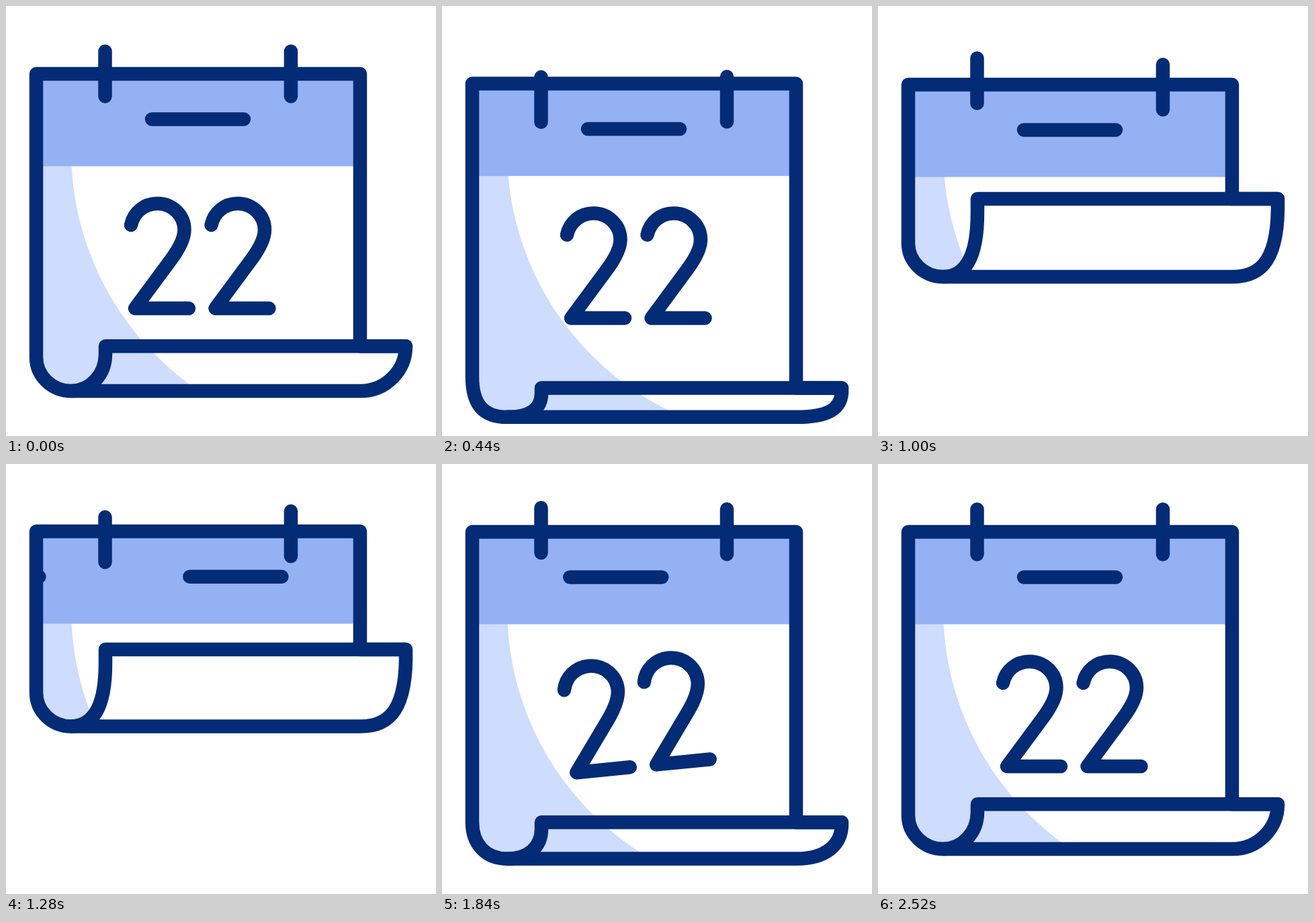
An HTML page with a canvas for the animation above (2.88 s loop, 640x640 px).

```html
<!DOCTYPE html>
<html lang="en">
<head>
<meta charset="utf-8">
<title>Calendar</title>
<style>
  html, body { margin: 0; width: 100%; height: 100%; overflow: hidden; background: #fff; }
  canvas { display: block; width: 100vmin; height: 100vmin; }
</style>
</head>
<body>
<canvas id="stage" width="640" height="640"></canvas>
<script>
const ctx = document.getElementById('stage').getContext('2d');
const NAVY = '#042b76', HEADER = '#94b1f3', SHADE = '#cedcfd';
const LOOP = 2880, STEP = 40, SETTLED = 2520;
const LEFT = 45, RIGHT = 527, CURL = 148, EDGE = 595;
const LONGEST_ROLL = 116, SHORTEST_PAGE = 286;

// Eased progress from time a to time b.
function ease(t, a, b) {
  const u = Math.min(1, Math.max(0, (t - a) / (b - a)));
  return u * u * (3 - 2 * u);
}

// Adds eased moves, each [from, to, distance], to a resting value.
const moves = (rest, ...list) => t =>
  list.reduce((value, [a, b, by]) => value + by * ease(t, a, b), rest);

const bodyTop = moves(101, [0, 425, 15], [425, 680, -46], [680, 1000, 47], [1000, 1480, -27], [1480, 1840, 11]);
const ringY = moves(101, [0, 150, -8], [150, 420, 47], [420, 700, -85], [700, 1090, 76], [1090, 1500, -61], [1500, 1860, 31]);
const pageLength = moves(472, [0, 355, 39], [355, 900, -225], [1240, 1715, 216], [1715, 1960, -30]);
const calm = moves(1, [0, 400, -1], [1640, 2040, 1]);
const dashShift = moves(0, [1040, 2000, 361]);
const tilt = moves(0, [1440, 1600, 4], [1600, 1840, -9.7], [1840, 2100, 7.7], [2100, 2400, -2]);

const digit = new Path2D('M186 326C190 307 206 294 225.5 294C248 294 265.5 312 265.5 333' +
  'C265.5 345 257 362 246 377L192 450H272');

function line(x1, y1, x2, y2) {
  ctx.beginPath();
  ctx.moveTo(x1, y1);
  ctx.lineTo(x2, y2);
  ctx.stroke();
}

function clipped(x, y, w, h, paint) {
  ctx.save();
  ctx.beginPath();
  ctx.rect(x, y, w, h);
  ctx.clip();
  paint();
  ctx.restore();
}

function draw(t) {
  const top = bodyTop(t), length = pageLength(t), bottom = top + length;
  const stir = 1 - calm(t);

  // The roll grows as the page shortens, and its curves get squarer in motion.
  const roll = LONGEST_ROLL - 0.345 * (length - SHORTEST_PAGE) + 15 * calm(t);
  const fold = bottom - roll;
  const squash = stir * (LONGEST_ROLL - roll) / 73;
  const corner = 50 + 10 * squash, round = 0.55 + 0.13 * squash;
  const bendX = 0.55 + 0.1 * stir, bendY = 0.55 + 0.22 * stir;

  ctx.fillStyle = '#fff';
  ctx.fillRect(0, 0, 640, 640);
  ctx.strokeStyle = NAVY;
  ctx.lineWidth = 20.5;
  ctx.lineCap = ctx.lineJoin = 'round';

  const outline = new Path2D();
  outline.moveTo(RIGHT, fold);
  outline.lineTo(RIGHT, top);
  outline.lineTo(LEFT, top);
  outline.lineTo(LEFT, bottom - corner);
  outline.bezierCurveTo(LEFT, bottom - corner * (1 - round), 97 - 52 * round, bottom, 97, bottom);
  outline.lineTo(528, bottom);
  outline.bezierCurveTo(528 + 67 * bendX, bottom, EDGE + 2 * stir, fold + roll * bendY, EDGE, fold);
  outline.closePath();

  ctx.fillStyle = SHADE;
  ctx.fill(outline);
  ctx.fillStyle = '#fff';
  ctx.beginPath();
  ctx.arc(527, 216, 430, 0, 2 * Math.PI);
  ctx.fill();
  ctx.fillStyle = HEADER;
  ctx.fillRect(LEFT, top, RIGHT - LEFT, 137.5);

  clipped(LEFT, 0, RIGHT - LEFT, 640, () => {
    const x = 217 + dashShift(t), y = top + 67.5;
    line(x, y, x + 137, y);
    line(x - 361, y, x - 224, y);
  });

  clipped(0, 0, 640, fold, () => {
    ctx.translate(289, 271 + top);
    ctx.rotate(tilt(t) * Math.PI / 180);
    ctx.translate(-289, -372);
    ctx.stroke(digit);
    ctx.translate(119.5, 0);
    ctx.stroke(digit);
  });

  ctx.stroke(outline);
  ctx.beginPath();
  ctx.moveTo(97, bottom);
  ctx.bezierCurveTo(97 + 51 * bendX, bottom, CURL, fold + roll * (0.64 + 0.1 * stir), CURL, fold + roll * 0.18);
  ctx.lineTo(CURL, fold);
  ctx.lineTo(EDGE, fold);
  ctx.stroke();

  // The left ring follows the right one a step later.
  for (const [x, delay] of [[147.5, STEP], [424, 0]]) {
    const y = ringY(t - delay);
    line(x, y - 33.5, x, y + 33.5);
  }
}

const start = performance.now();
function tick() {
  const t = (performance.now() - start) % LOOP;
  draw(Math.min(SETTLED, Math.floor(t / STEP) * STEP));
  requestAnimationFrame(tick);
}
tick();
</script>
</body>
</html>
```
